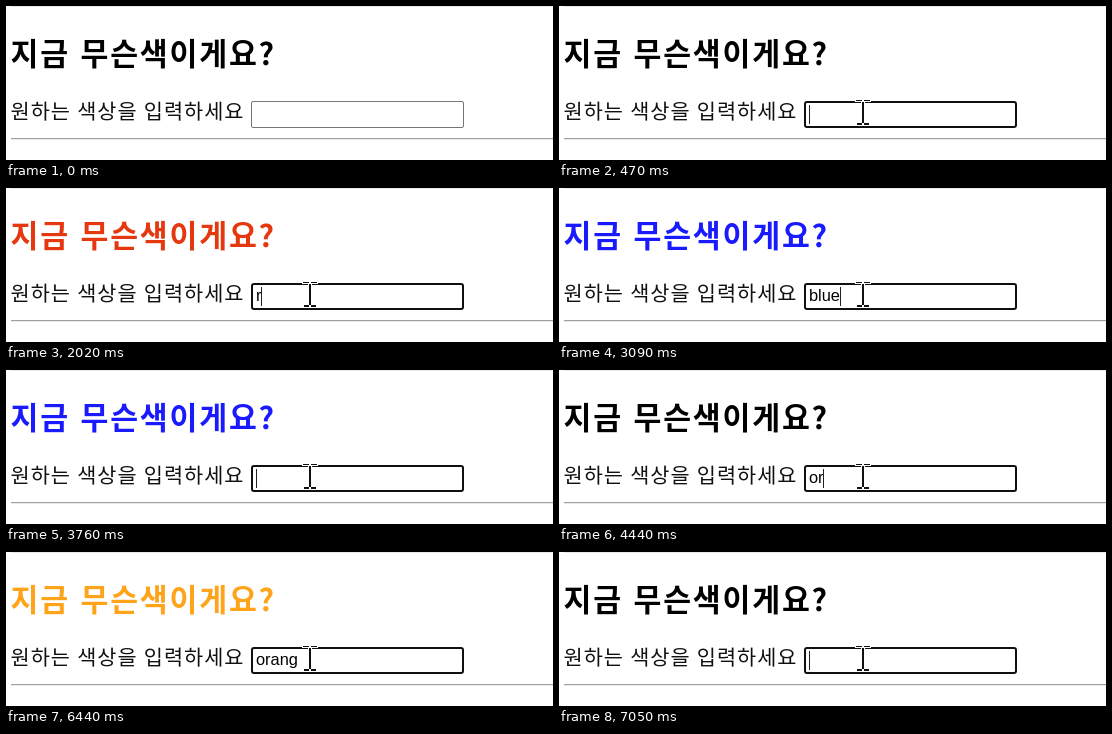
Write an HTML page with a canvas that moves like this. It is 547 by 154 pixels and loops after 7250 ms.

```html
<!DOCTYPE html>
<html lang="ko">
<head>
<meta charset="utf-8">
<title>Color input</title>
<style>
  html, body { margin: 0; width: 100%; height: 100%; overflow: hidden; background: #fff; }
  canvas { display: block; }
</style>
</head>
<body>
<canvas id="stage" width="547" height="154"></canvas>
<script>
const ctx = document.getElementById('stage').getContext('2d');
const LOOP = 7250;
const KOREAN = '"Noto Sans CJK KR", "Noto Sans CJK", sans-serif';
const BLACK = '#000', RED = '#e6380f', BLUE = '#1a1aff', ORANGE = '#ffa31a';
const ON = true, OFF = false;

// time, typed text, caret, heading colour
const typing = [
  [0, '', OFF, BLACK], [470, '', ON, BLACK], [670, 'r', ON, BLACK],
  [800, 're', ON, BLACK], [1000, 're', OFF, BLACK], [1140, 'red', ON, RED],
  [1340, 'red', OFF, RED], [1540, 'red', ON, RED], [1750, 'red', OFF, RED],
  [1880, 're', ON, RED], [1950, 're', OFF, RED], [2020, 'r', ON, RED],
  [2150, '', OFF, BLACK], [2350, '', ON, BLACK],
  [2550, 'b', ON, BLACK], [2620, 'bl', ON, BLACK], [2820, 'blu', ON, BLACK],
  [3020, 'blue', ON, BLACK], [3090, 'blue', ON, BLUE], [3290, 'blu', ON, BLUE],
  [3490, 'bl', ON, BLUE], [3690, 'b', ON, BLUE], [3760, '', ON, BLUE],
  [3890, '', OFF, BLACK], [4090, '', ON, BLACK],
  [4290, 'o', ON, BLACK], [4440, 'or', ON, BLACK], [4640, 'ora', ON, BLACK],
  [4840, 'oran', ON, BLACK], [5040, 'oran', OFF, BLACK], [5240, 'oran', ON, BLACK],
  [5310, 'ora', ON, BLACK], [5440, 'ora', OFF, BLACK], [5640, 'oran', ON, BLACK],
  [5710, 'orang', ON, BLACK], [5840, 'orange', ON, ORANGE], [6040, 'orange', OFF, ORANGE],
  [6240, 'orange', ON, ORANGE], [6310, 'orang', ON, ORANGE], [6440, 'orang', OFF, ORANGE],
  [6640, 'oran', ON, ORANGE], [6710, 'or', ON, ORANGE], [6780, 'o', ON, ORANGE],
  [6850, '', OFF, BLACK], [7050, '', ON, BLACK]
];

// time, pointer kind, x, y
const pointer = [
  [0, 'none', 0, 0], [70, 'arrow', 282, 146], [140, 'arrow', 285, 140],
  [270, 'arrow', 292, 126], [340, 'beam', 302, 100], [470, 'beam', 304, 107]
];

const at = (track, t) => track.findLast(step => step[0] <= t);

function rect(color, x, y, w, h) {
  ctx.fillStyle = color;
  ctx.fillRect(x, y, w, h);
}

function text(value, x, y, font, color, letter = 0, word = 0) {
  ctx.font = font;
  ctx.letterSpacing = letter + 'px';
  ctx.wordSpacing = word + 'px';
  ctx.fillStyle = color;
  ctx.fillText(value, x, y);
}

function rule(y) {
  rect('#a0a0a0', 5, y, 542, 1);
  rect('#eaeaea', 5, y + 1, 542, 1);
}

function drawField(focused) {
  ctx.beginPath();
  if (focused) ctx.roundRect(246, 96, 211, 25, 2);
  else ctx.roundRect(245.5, 95.5, 212, 26, 1.5);
  ctx.strokeStyle = focused ? '#101010' : '#767676';
  ctx.lineWidth = focused ? 2 : 1;
  ctx.stroke();
}

function drawBeam(x, y) {
  const parts = [[-7, -13, 6, 1], [1, -13, 6, 1], [-1, -11, 2, 21], [-6, 10, 5, 2], [1, 10, 5, 2]];
  for (const [dx, dy, w, h] of parts) rect('#fff', x + dx - 1, y + dy - 1, w + 2, h + 2);
  for (const [dx, dy, w, h] of parts) rect('#111', x + dx, y + dy, w, h);
}

function drawArrow(x, y) {
  ctx.save();
  ctx.translate(x + 0.5, y + 0.5);
  const path = new Path2D('M0 0V16L4 12L7 18L9 17L6 11H11Z');
  ctx.fillStyle = '#fff';
  ctx.strokeStyle = '#111';
  ctx.lineWidth = 1;
  ctx.fill(path);
  ctx.stroke(path);
  ctx.restore();
}

function draw(t) {
  const [, typed, caret, heading] = at(typing, t);
  const [, kind, px, py] = at(pointer, t);

  rect('#fff', 0, 0, 547, 154);
  rule(-1);
  rule(132);
  text('지금 무슨색이게요?', 4.5, 58.5, `700 30.3px ${KOREAN}`, heading, 1.8, 2);
  text('원하는 색상을 입력하세요', 4.5, 113, `400 20.8px ${KOREAN}`, '#111', 1, 0.6);

  drawField(t >= 470);
  text(typed, 250, 113, '16.4px "Liberation Sans", Arial, sans-serif', '#000');
  if (caret) rect('#222', Math.floor(250.3 + ctx.measureText(typed).width), 99, 1, 19);

  if (kind === 'arrow') drawArrow(px, py);
  if (kind === 'beam') drawBeam(px, py);
}

function tick() {
  draw(performance.now() % LOOP);
  requestAnimationFrame(tick);
}
tick();
</script>
</body>
</html>
```
